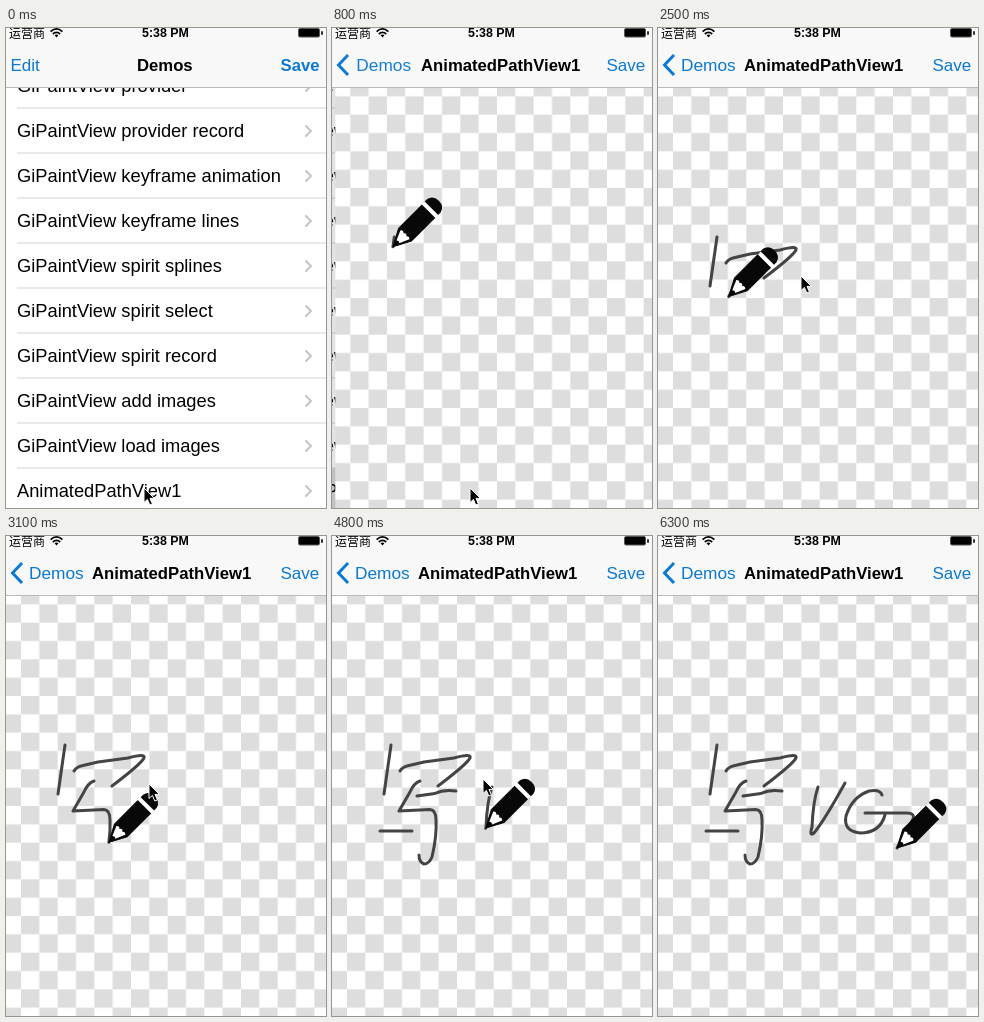
An HTML page for the animation above (6400 ms loop, 320x480 px).

```html
<!DOCTYPE html>
<html lang="en">
<head>
<meta charset="utf-8">
<title>Path drawing demo</title>
<style>
  html, body { margin: 0; width: 100%; height: 100%; overflow: hidden; background: #fff; }
  svg { display: block; width: 320px; height: 480px; }
  text { font-family: "Liberation Sans", Arial, sans-serif; font-size: 17px; fill: #000; white-space: pre; }
  .row { font-size: 18.3px; }
  .blue { fill: #0b78d4; }
  .bold { font-weight: bold; font-size: 16.7px; }
  .clock { font-weight: bold; font-size: 12.4px; }
  .carrier { font: 12px "Noto Sans CJK SC", "Noto Sans CJK", sans-serif; }
  .line { fill: none; stroke-linecap: round; stroke-linejoin: round; }
  #ink { stroke: #444; stroke-width: 3; }
</style>
</head>
<body>
<svg viewBox="0 0 320 480">
  <defs>
    <pattern id="checker" width="36.667" height="36.667" x="15" y="50" patternUnits="userSpaceOnUse">
      <rect width="36.667" height="36.667" fill="#fff"/>
      <path d="M0 0h18.333v36.667h18.333v-18.333h-36.667z" fill="#ddd" fill-rule="evenodd"/>
    </pattern>
  </defs>

  <g id="list">
    <rect width="320" height="480" fill="#fff"/>
    <rect id="pick" y="440" width="320" height="45" fill="#d9d9d9"/>
    <g id="rows"></g>
  </g>
  <rect id="dim" width="320" height="480"/>

  <g id="detail">
    <rect width="320" height="480" fill="url(#checker)"/>
    <g id="ink" class="line"></g>
    <g id="pencil">
      <g transform="rotate(-45)">
        <path d="M0 0L17 -9H50V9H17Z" fill="#080808" stroke="#080808" stroke-linejoin="round"/>
        <path d="M7 -2L17 -6.3Q19.5 -4 17 -2Q20 0 17 2Q19.5 4 17 6.3L7 2Q9 0 7 -2Z" fill="#fff"/>
        <path d="M50.5 -9h4v18h-4z" fill="#fff"/>
        <path d="M54.5 -9.5H58Q65 -8 65 0Q65 8 58 9.5H54.5Z" fill="#080808"/>
      </g>
    </g>
  </g>

  <rect width="320" height="59" fill="#f8f8f8"/>
  <rect y="59" width="320" height="1" fill="#b9b9b9"/>
  <text class="carrier" x="3" y="9.5">运营商</text>
  <g class="line" stroke="#000" stroke-width="1.7" style="stroke-linecap:butt">
    <path d="M44.6 3.6Q50.5 -1.8 56.4 3.6M46.8 6Q50.5 2.6 54.2 6"/>
    <path d="M48.6 7.2Q50.5 5.6 52.4 7.2L50.5 9.4Z" fill="#000" stroke="none"/>
  </g>
  <text class="clock" x="136" y="9">5:38 PM</text>
  <rect x="292.5" y="0.5" width="21" height="8.5" rx="1.5" fill="#000" stroke="#555"/>
  <rect x="315" y="3" width="2" height="4" rx="1" fill="#333"/>

  <g id="oldBar">
    <text class="blue" x="4.5" y="43">Edit</text>
    <text class="blue bold" x="274.5" y="43">Save</text>
  </g>
  <text id="oldTitle" class="bold" x="131" y="43">Demos</text>
  <g id="newBar">
    <path class="line" d="M15 28L6.5 37L15 46" stroke="#0b78d4" stroke-width="3" style="stroke-linecap:square;stroke-linejoin:miter"/>
    <text class="blue" x="274.5" y="43">Save</text>
  </g>
  <text id="back" class="blue" x="23" y="43" style="font-size:17.3px">Demos</text>
  <text id="newTitle" class="bold" x="86" y="43">AnimatedPathView1</text>

  <path id="cursor" d="M0 0V14.5L3.4 11.4L5.8 17L8.4 15.9L6 10.4H10.4Z" fill="#000" stroke="#fff" stroke-width="1"/>
</svg>

<script>
const LOOP = 6400, STEP = 100;
const $ = id => document.getElementById(id);
const clamp = x => Math.max(0, Math.min(1, x));
const move = (node, x, y = 0) => node.setAttribute("transform", `translate(${x} ${y})`);
const fade = (node, a) => node.setAttribute("opacity", clamp(a));

function add(parent, tag, attrs, text = "") {
  const node = document.createElementNS("http://www.w3.org/2000/svg", tag);
  for (const k in attrs) node.setAttribute(k, attrs[k]);
  node.textContent = text;
  return parent.appendChild(node);
}

const kinds = ["provider", "provider record", "keyframe animation", "keyframe lines",
  "spirit splines", "spirit select", "spirit record", "add images", "load images"];
[...kinds.map(k => "GiPaintView " + k), "AnimatedPathView1"].forEach((label, i) => {
  const y = 57.5 + 45 * i;
  add($("rows"), "text", { class: "row", x: 11, y: y + 6 }, label);
  add($("rows"), "path", { class: "line", d: `M300 ${y - 4.5}l5 5l-5 5`, stroke: "#c4c4c9", "stroke-width": 2 });
  add($("rows"), "rect", { x: 11, y: y + 22, width: 309, height: 1, fill: "#d4d4d6" });
});

// Each stroke: path, then [time, drawn share] keys
const strokes = [
  ["M59 209L52 258", [700, 0], [1200, 1]],
  ["M68 235Q70 231 77 229.500L92 226L122 222Q140 217 138 222Q135 228 106 250", [1320, 0], [2100, 1]],
  ["M88 245Q82 247 78 256L67 275L98 273.500Q104 274 104 284Q105 300 100 321Q97 328 92 328Q87 326 87 319", [2260, 0], [3400, 1]],
  ["M85 260L103 257.500Q112 253 124 255", [3510, 0], [3950, 1]],
  ["M48 295H80", [4270, 0], [4560, 1]],
  ["M160 251Q155 266 154 291Q151 301 156 297Q166 285 187 247", [4600, 0], [4800, 0.38], [5000, 0.46], [5500, 1]],
  ["M224 259Q222 253 211 255Q194 261 188 280Q185 295 202 297Q222 297 227 279", [5620, 0], [6000, 1]],
  ["M207 277H249Q257 277 255 283L239 312", [6030, 0], [6300, 1]]
].map(([d, ...keys]) => {
  const path = add($("ink"), "path", { d });
  return { path, keys, length: path.getTotalLength() };
});

const cursorKeys = [[800, 138, 460], [1400, 143, 248], [3100, 143, 248], [3500, 151, 246], [4300, 151, 246], [4700, 151, 243]];

// Linear value of column c in a list of timed keys
function track(keys, t, c = 1) {
  if (t <= keys[0][0]) return keys[0][c];
  for (let i = 1; i < keys.length; i++) {
    const a = keys[i - 1], b = keys[i];
    if (t < b[0]) return a[c] + (b[c] - a[c]) * (t - a[0]) / (b[0] - a[0]);
  }
  return keys[keys.length - 1][c];
}

function pushProgress(t) {
  const s = Math.max(0, t - 200) * 0.011;
  return t >= 900 ? 1 : 1 - (1 + s) * Math.exp(-s);
}

function drawPush(t) {
  const p = pushProgress(t), rest = 1 - p, late = (p - 0.75) * 4;
  move($("list"), -96 * p);
  move($("detail"), 320 * rest);
  fade($("dim"), 0.11 * p);
  fade($("pick"), t >= 100 ? 1 : 0);
  fade($("oldBar"), rest * 1.3);
  fade($("oldTitle"), 1 - 2 * p);
  move($("oldTitle"), -108 * p);
  fade($("newBar"), late * 0.4 + 0.6 * (p > 0.95));
  fade($("back"), late);
  move($("back"), 125 * rest);
  fade($("newTitle"), p * 1.1);
  move($("newTitle"), 290 * rest);
}

function drawInk(t) {
  let tip = { x: 60, y: 218 };
  for (const { path, keys, length } of strokes) {
    const begun = t >= keys[0][0];
    path.setAttribute("visibility", begun ? "visible" : "hidden");
    if (!begun) continue;
    const done = length * track(keys, t);
    path.setAttribute("stroke-dasharray", `${done} ${length + 9}`);
    tip = path.getPointAtLength(done);
  }
  move($("pencil"), tip.x, tip.y);
}

function frame(now) {
  const t = Math.floor(now % LOOP / STEP) * STEP;
  drawPush(t);
  drawInk(t);
  move($("cursor"), track(cursorKeys, t), track(cursorKeys, t, 2));
  fade($("cursor"), t < 5000 ? 1 : 0);
}

const start = performance.now();
function tick() {
  frame(performance.now() - start);
  requestAnimationFrame(tick);
}
tick();
</script>
</body>
</html>
```
